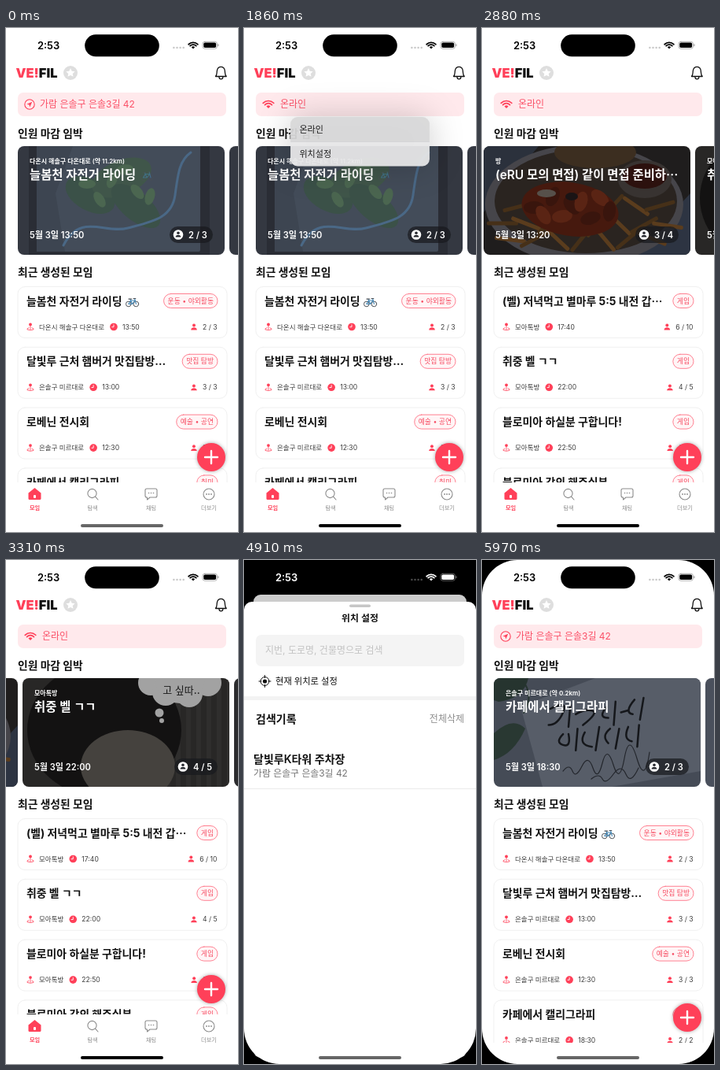
These frames come from a looping animation (295x640 px, 6730 ms). An HTML page with a canvas:

```html
<!DOCTYPE html>
<html lang="ko">
<head>
<meta charset="utf-8">
<title>모임 앱</title>
<style>
html, body { margin: 0; width: 100%; height: 100%; overflow: hidden; background: #fff; }
canvas { display: block; width: 295px; height: 640px; }
</style>
</head>
<body>
<canvas id="stage"></canvas>
<script>
const W = 295, H = 640, LOOP = 6730;
const RED = '#ff4059', INK = '#111', GRAY = '#8b8b8b';
const FONT = 'Inter, "Noto Sans CJK KR", "Noto Sans CJK", sans-serif';
const cv = document.getElementById('stage'), dpr = window.devicePixelRatio || 1;
cv.width = W * dpr;
cv.height = H * dpr;
const c = cv.getContext('2d');

// The picture only advances at these moments: [first, last, count]
const stamps = [0];
for (const [a, b, n] of [[1120, 1760, 7], [1860, 2190, 4], [2380, 2380, 1], [2630, 2630, 1],
  [2880, 3520, 7], [3640, 4210, 6], [4320, 4910, 6], [5240, 5240, 1], [5510, 5970, 5]])
  for (let i = 0; i < n; i++) stamps.push(n > 1 ? a + (b - a) * i / (n - 1) : a);

const clamp = v => Math.max(0, Math.min(1, v));
const easeOut = u => 1 - (1 - clamp(u)) ** 3;
function track(t, pts) {
  if (t <= pts[0][0]) return pts[0][1];
  for (let i = 1; i < pts.length; i++) {
    const [a, x] = pts[i - 1], [b, y] = pts[i];
    if (t <= b) return x + (y - x) * (t - a) / (b - a);
  }
  return pts[pts.length - 1][1];
}

function paint(fill, stroke, lw = 1) {
  if (fill) { c.fillStyle = fill; c.fill(); }
  if (stroke) { c.strokeStyle = stroke; c.lineWidth = lw; c.stroke(); }
}
function box(x, y, w, h, r, fill, stroke, lw) {
  c.beginPath();
  c.roundRect(x, y, w, h, r);
  paint(fill, stroke, lw);
}
function dot(x, y, r, fill, stroke, lw) {
  c.beginPath();
  c.arc(x, y, r, 0, 7);
  paint(fill, stroke, lw);
}
function oval(x, y, rx, ry, fill, rot = 0) {
  c.beginPath();
  c.ellipse(x, y, rx, ry, rot, 0, 7);
  paint(fill);
}
function path(d, fill, stroke, lw) {
  const p = new Path2D(d);
  if (fill) { c.fillStyle = fill; c.fill(p); }
  if (stroke) { c.strokeStyle = stroke; c.lineWidth = lw; c.stroke(p); }
}
function text(s, x, y, size, color, weight = 400, align = 'left') {
  c.font = `${weight} ${size}px ${FONT}`;
  c.textAlign = align;
  c.fillStyle = color;
  c.fillText(s, x, y + size * 0.36);
  return c.measureText(s).width;
}
function at(x, y, draw, k = 1) {
  c.save();
  c.translate(x, y);
  c.scale(k, k);
  draw();
  c.restore();
}
function clipBox(x, y, w, h, r) {
  c.beginPath();
  c.roundRect(x, y, w, h, r);
  c.clip();
}

// ---- data ----
const ADDRESS = '가람 은솔구 은솔3길 42', FAR = '다온시 해솔구 다온대로', NEAR = '은솔구 미르대로', CHAT = '모아톡방';
const item = (title, tag, place, time, people, bike) => ({ title, tag, place, time, people, bike });
const localList = [
  item('늘봄천 자전거 라이딩', '운동 • 야외활동', FAR, '13:50', '2 / 3', true),
  item('달빛루 근처 햄버거 맛집탐방…', '맛집 탐방', NEAR, '13:00', '3 / 3'),
  item('로베닌 전시회', '예술 • 공연', NEAR, '12:30', '3 / 3'),
  item('카페에서 캘리그라피', '취미', NEAR, '18:30', '2 / 2')
];
const onlineList = [
  item('(벨) 저녁먹고 별마루 5:5 내전 갑⋯', '게임', CHAT, '17:40', '6 / 10'),
  item('취중 벨 ㄱㄱ', '게임', CHAT, '22:00', '4 / 5'),
  item('블로미아 하실분 구합니다!', '게임', CHAT, '22:50', '3 / 5'),
  item('블로미아 강의 해주실분', '게임', CHAT, '14:20', '2 / 2')
];
const card = (scene, place, title, time, people, bike) => ({ scene, place, title, time, people, bike });
const rideCards = [card(board, FAR + ' (약 11.2km)', '늘봄천 자전거 라이딩', '13:50', '2 / 3', true), card(plain('#343841'))];
const cafeCards = [card(letter, NEAR + ' (약 0.2km)', '카페에서 캘리그라피', '18:30', '2 / 3'), card(plain('#4a505c'))];
const onlineCards = [
  card(food, '방', '(eRU 모의 면접) 같이 면접 준비하⋯', '13:20', '3 / 4'),
  card(toy, CHAT, '취중 벨 ㄱㄱ', '22:00', '4 / 5'),
  card(plain('#2c2c2e'))
];

// ---- card pictures, 263 x 138 ----
function plain(color) { return () => box(0, 0, 263, 138, 0, color); }
function board() {
  plain('#343841')();
  box(14, -6, 230, 150, 3, '#2a2d35');
  box(24, -6, 208, 140, 2, '#434c59');
  path('M24 0L70 0 48 60 60 134 24 134Z', '#3d4551');
  oval(92, 62, 34, 20, '#3b5148', 0.5);
  oval(132, 40, 40, 22, '#40564a', -0.4);
  oval(150, 76, 38, 18, '#3b5148', 0.7);
  for (let i = 0; i < 6; i++) oval(88 + i * 16, 48 + 20 * Math.sin(i * 1.7), 11, 6, '#4b6650', i);
  path('M58 126C80 84 110 112 140 104S196 92 200 62 206 18 220 8', null, '#4a6886', 3);
}
function food() {
  plain('#1f1d1d')();
  path('M0 0H70L0 84Z', '#2b313c');
  path('M263 60V138H190Z', '#2d3442');
  oval(128, 74, 126, 76, '#46454a');
  oval(130, 70, 116, 66, '#2a2420');
  oval(142, 8, 52, 20, '#3c2e20');
  for (let i = 0; i < 22; i++) at(24 + i * 10, 98 + 24 * Math.sin(i * 2.1), () => {
    c.rotate(Math.sin(i * 3) * 0.9);
    box(-20, -2.5, 40, 5, 2, i % 2 ? '#5a3c1d' : '#463018');
  });
  oval(110, 80, 62, 34, '#46190e', 0.15);
  for (let i = 0; i < 9; i++) oval(64 + i * 12, 78 + 14 * Math.sin(i * 2.4), 13, 8, i % 2 ? '#5a2414' : '#39150d', i);
  oval(112, 64, 8, 5, '#1a1415');
  oval(80, 60, 12, 5, '#56504a');
  oval(205, 42, 34, 24, '#383331');
  oval(205, 38, 28, 16, '#2c110e');
}
function toy() {
  plain('#282726')();
  for (let i = 0; i < 7; i++) box(182 + i * 13, 0, 6, 138, 0, '#2f2e2d');
  oval(104, 66, 98, 86, '#131212');
  oval(134, 112, 60, 46, '#45423e');
  for (const [x, y, r] of [[163, 6, 16], [182, 18, 17], [212, 20, 17], [236, 6, 17], [200, 0, 32]]) dot(x, y, r, '#a2a2a2');
  dot(174, 44, 5.5, '#a2a2a2');
  dot(177, 54, 3, '#a2a2a2');
  text('고 싶따..', 202, 15, 13, '#1c1c1c', 500, 'center');
}
function letter() {
  plain('#454b56')();
  path('M34 36L150 -8 263 -8 263 118 150 138 62 138Z', '#575d68');
  path('M0 0H44Q38 26 6 30L0 28Z', '#26342f');
  path('M0 70Q24 48 40 64 26 96 0 104Z', '#293832');
  path('M36 2Q52 22 38 44', null, '#26342f', 2);
  at(-20, -14, () => {
    path('M80 46q20-10 14 4t-16 14m24-22l-2 24m8-14q10-6 18-4t-10 16m26-20q-10 12 2 12m8-18l-2 26m8-14l7-2m8-12q-12 14-2 16m12-18l-4 24', null, '#15171b', 2.2);
    path('M94 74q-9 9 0 12t6-12m10-6l-2 24m10-20q-8 14 8 16m8-22l-4 26m16-24q-10 8-2 16m12-16l-4 22m14-24q-6 14 4 16m8-18l-2 24', null, '#15171b', 2.2);
  }, 1.15);
  path('M88 118q8-10 12 0t12-6 14 2 12-6 14 2 14-8 16 0 16-8M124 128q10-8 14 0t14-6 16 0 16-8', null, '#23262c', 1.2);
}

// ---- icons ----
function wifi(x, y, k, color, lw) {
  for (const r of [6.3, 9.5]) {
    c.beginPath();
    c.arc(x, y, r * k, -2.36, -0.78);
    paint(null, color, lw);
  }
  c.beginPath();
  c.moveTo(x, y);
  c.arc(x, y, 3.6 * k, -2.36, -0.78);
  paint(color);
}
function person(x, y, k, color) {
  at(x, y, () => {
    dot(0, -2, 2.1, color);
    path('M-4 4.2C-4-.2 4-.2 4 4.2Z', color);
  }, k);
}
function pin(x, y) {
  dot(x, y - 3, 1.9, RED);
  path(`M${x} ${y - 1}v4M${x - 2} ${y + 1.2}q-3 1-2 2.2 4 1.6 8 0 1-1.2-2-2.2`, null, RED, 0.8);
}
function clock(x, y) {
  dot(x, y, 4.8, RED);
  path(`M${x} ${y - 2.6}v2.8h-2.2`, null, '#fff', 0.9);
}
function bike(x, y, a) {
  c.globalAlpha *= a;
  at(x, y, () => {
    dot(-4.8, 2, 3.3, null, '#4c5157', 1);
    dot(4.8, 2, 3.3, null, '#4c5157', 1);
    path('M-4.8 2L-2-2.5H3.4L0 2H-4.8M0 2L-2.6-4M4.8 2L3-5', null, '#4386b4', 1.1);
    path('M-4.6-4.4h3.6M1.4-5h2.8', null, '#4c5157', 1.2);
  });
  c.globalAlpha /= a;
}
function star(x, y, r) {
  c.beginPath();
  for (let i = 0; i < 10; i++) {
    const a = i * Math.PI / 5 - Math.PI / 2, q = i % 2 ? r * 0.48 : r;
    c.lineTo(x + q * Math.cos(a), y + q * Math.sin(a));
  }
  c.closePath();
  paint('#fff');
}

// ---- main screen ----
function header(online) {
  const w = text('VE!', 12.5, 57, 16.4, RED, 900);
  text('FIL', 12.5 + w, 57, 16.4, INK, 900);
  dot(82, 57, 9, '#dedede');
  star(82, 57, 6);
  path('M266.5 61.5C268.4 59.5 268 57 268.3 54.5C268.7 51.3 270.5 49.4 273.3 49.4S278 51.3 278.3 54.5C278.6 57 278.2 59.5 280.2 61.5Z', null, INK, 1.3);
  path('M271 62.5a2.4 2.4 0 0 0 4.8 0', null, INK, 1.3);
  box(15, 82, 265, 30, 7, '#ffe9ec');
  if (online) wifi(31, 102, 1, RED, 1.7);
  else {
    dot(30, 97, 6.2, null, RED, 1.1);
    path('M33.2 93.8L26.4 96.7 29.5 97.5 30.3 100.6Z', RED);
  }
  text(online ? '온라인' : ADDRESS, online ? 46 : 43, 97, 12, '#fb5067');
}
function drawCard(d, x) {
  if (x > W || x < -263) return;
  c.save();
  clipBox(x, 150, 263, 138, 8);
  c.translate(x, 150);
  d.scene();
  if (d.title) {
    text(d.place, 15, 19.5, 8, '#fff', 600);
    const w = text(d.title, 15, 36, 15.4, '#fff', 600);
    if (d.bike) bike(15 + w + 14, 38, 0.55);
    text('5월 3일 ' + d.time, 15, 113, 11.1, '#fff', 600);
    box(193, 102, 55, 21, 10.5, 'rgba(24,25,30,.72)');
    dot(204, 112.5, 6.3, '#fff');
    person(204, 112, 0.85, '#25272d');
    text(d.people, 217, 113, 11.1, '#fff', 600);
  }
  c.restore();
}
function drawItem(d, y) {
  box(15, y, 266, 65, 9, '#fff', '#f0f0f0', 1);
  const w = text(d.title, 26, y + 18, 13.9, INK, 700);
  if (d.bike) bike(26 + w + 13, y + 20, 1);
  c.font = `400 8.8px ${FONT}`;
  const tw = c.measureText(d.tag).width;
  box(259 - tw, y + 9, tw + 10, 18, 9, '#fff5f6', '#ff7386', 0.9);
  text(d.tag, 264, y + 18, 8.8, '#f74b62', 400, 'right');
  const row = y + 51, end = 42 + text(d.place, 42, row, 8.5, '#3c3c3c');
  pin(31, row);
  clock(end + 12, row);
  text(d.time, end + 23, row, 8.6, '#3c3c3c');
  const pw = text(d.people, 268.5, row, 8.6, '#3c3c3c', 400, 'right');
  person(268.5 - pw - 11, row, 0.95, RED);
}
function tabs() {
  box(0, 577, W, 63, 0, '#fff');
  path('M36.5 584L44.5 590.5V597.5Q44.5 599 43 599H30Q28.5 599 28.5 597.5V590.5Z', RED);
  box(35, 593, 3, 4, 1, '#fff');
  dot(109.5, 591, 5.6, null, GRAY, 1.1);
  path('M113.6 595.2L117 599', null, GRAY, 1.1);
  path('M179 585H190Q192 585 192 587V594Q192 596 190 596H183L179.5 599V596H179Q177 596 177 594V587Q177 585 179 585Z', null, GRAY, 1.1);
  dot(258, 592, 7, null, GRAY, 1.1);
  for (const i of [-1, 0, 1]) {
    dot(184.5 + i * 3, 590.5, 0.8, GRAY);
    dot(258 + i * 3, 592, 0.9, GRAY);
  }
  text('모임', 36.5, 609, 7.2, RED, 700, 'center');
  [['탐색', 110], ['채팅', 184.5], ['더보기', 258]].forEach(([s, x]) => text(s, x, 609, 7.2, GRAY, 400, 'center'));
}
function mainScreen(t) {
  const online = t >= 2380 && t < 5240, showTabs = t < 4210;
  const cards = t < 2190 ? rideCards : t < 5240 ? onlineCards : cafeCards;
  const shift = t < 5240 ? track(t, [[2770, 0], [2880, -13], [3000, -110], [3100, -205], [3200, -248], [3306, -263], [3520, -269]]) : 0;
  box(0, 0, W, H, 0, '#fff');
  header(t >= 1760 && t < 4210);
  text('인원 마감 임박', 15, 134, 13.8, INK, 700);
  cards.forEach((d, i) => drawCard(d, 15 + shift + i * 269));
  text('최근 생성된 모임', 15, 310.5, 13.8, INK, 700);
  c.save();
  clipBox(0, 320, W, showTabs ? 257 : 293, 0);
  (online ? onlineList : localList).forEach((d, i) => drawItem(d, 328.5 + i * 76.8));
  c.restore();
  if (showTabs) tabs();
  const fy = showTabs ? 545 : 581;
  c.save();
  c.shadowColor = 'rgba(0,0,0,.35)';
  c.shadowBlur = 5 * dpr;
  dot(261, fy, 18, RED);
  c.restore();
  path(`M253 ${fy}h16M261 ${fy - 8}v16`, null, '#fff', 2.4);
}

// ---- pull-down menu ----
function menu(t, open, close, pick) {
  if (t < open || t >= close + 230) return;
  const gone = Math.max(0, t - close), grow = easeOut((t - open + 60) / 280);
  c.save();
  c.globalAlpha = grow * (1 - (gone / 230) ** 2);
  c.translate(147.5, 113);
  c.scale(grow * (1 - gone * 0.0009), grow * (1 - gone * 0.0009));
  c.save();
  c.shadowColor = 'rgba(0,0,0,.22)';
  c.shadowBlur = 44 * dpr;
  box(-93.5, 0, 187, 66, 9.5, '#e9e9ea');
  c.restore();
  if (t >= close - 160) {
    c.save();
    clipBox(-93.5, 0, 187, 66, 9.5);
    box(-93.5, pick * 33, 187, 33, 0, 'rgba(0,0,0,.07)');
    c.restore();
  }
  box(-93.5, 32.7, 187, 0.6, 0, '#c6c6c8');
  text('온라인', -81.5, 17, 11.7, INK);
  text('위치설정', -81.5, 50, 11.7, INK);
  c.restore();
}

// ---- location sheet ----
function sheet(p) {
  const y = 53 + (1 - p) * 587;
  c.save();
  clipBox(0, 0, W, H, [0, 0, 45, 45]);
  box(0, y, W, 640, [10, 10, 0, 0], '#fff');
  c.translate(0, y - 53);
  box(134, 56.5, 27, 3.6, 1.8, '#c6c6c6');
  text('위치 설정', 147.5, 74, 11.9, INK, 600, 'center');
  box(15, 95, 265, 40, 7, '#f4f4f4');
  text('지번, 도로명, 건물명으로 검색', 27, 115, 12, '#c3c3c3');
  dot(26.5, 154, 5.4, null, INK, 1);
  dot(26.5, 154, 2.6, INK);
  path('M26.5 146.5v3M26.5 158.5v3M19 154h3M31 154h3', null, INK, 1);
  text('현재 위치로 설정', 40, 154, 11.3, INK, 500);
  box(0, 173, W, 5, 0, '#f3f3f3');
  text('검색기록', 15, 201.5, 14, INK, 600);
  text('전체삭제', 280, 201.5, 12, '#8d8d8d', 400, 'right');
  text('달빛루K타워 주차장', 12, 252.5, 14, INK, 600);
  text(ADDRESS, 12, 271, 11.9, '#757575');
  box(0, 290, W, 0.8, 0, '#e4e4e4');
  c.restore();
}

function system(t, p) {
  const light = p > 0.5, ink = light ? '#fff' : '#000';
  text('2:53', 54, 22, 12.9, ink, 600, 'center');
  box(100.2, 8.3, 94.6, 28, 14, '#000');
  for (let i = 0; i < 4; i++) dot(213.4 + i * 4.1, 25, 1.3, light ? '#4a4a4a' : '#c9c9c9');
  wifi(238, 26.5, 0.86, ink, 1.8);
  box(250, 17.3, 18.4, 9, 2.8, null, light ? '#777' : '#9a9a9a', 0.8);
  box(251.3, 18.6, 15.8, 6.4, 1.7, ink);
  box(269.4, 20.3, 1.1, 3, 0.5, light ? '#777' : '#9a9a9a');
  box(95, 630, 105, 4, 2, t < 1120 || t >= 4910 ? '#666' : '#000');
}

function draw(t) {
  c.setTransform(dpr, 0, 0, dpr, 0, 0);
  c.lineCap = c.lineJoin = 'round';
  const p = t < 5240 ? easeOut((t - 4380) / 500) : 1 - easeOut((t - 5440) / 560);
  const lifted = t > 4380;
  box(0, 0, W, H, 0, lifted ? '#000' : '#fff');
  c.save();
  if (lifted) {
    const k = 1 - 0.0814 * p;
    c.translate(12 * p, 44 * p);
    c.scale(k, k);
    clipBox(0, 0, W, H, 45 - 35 * p);
  }
  mainScreen(t);
  if (p > 0) box(0, 0, W, H, 0, `rgba(0,0,0,${0.2 * p})`);
  menu(t, 1120, 1800, 0);
  menu(t, 3640, 4210, 1);
  c.restore();
  if (p > 0.001) sheet(p);
  system(t, p);
}

function loop(now) {
  const t = now % LOOP;
  draw(stamps.filter(s => s <= t + 0.01).pop());
  requestAnimationFrame(loop);
}
requestAnimationFrame(loop);
</script>
</body>
</html>
```
